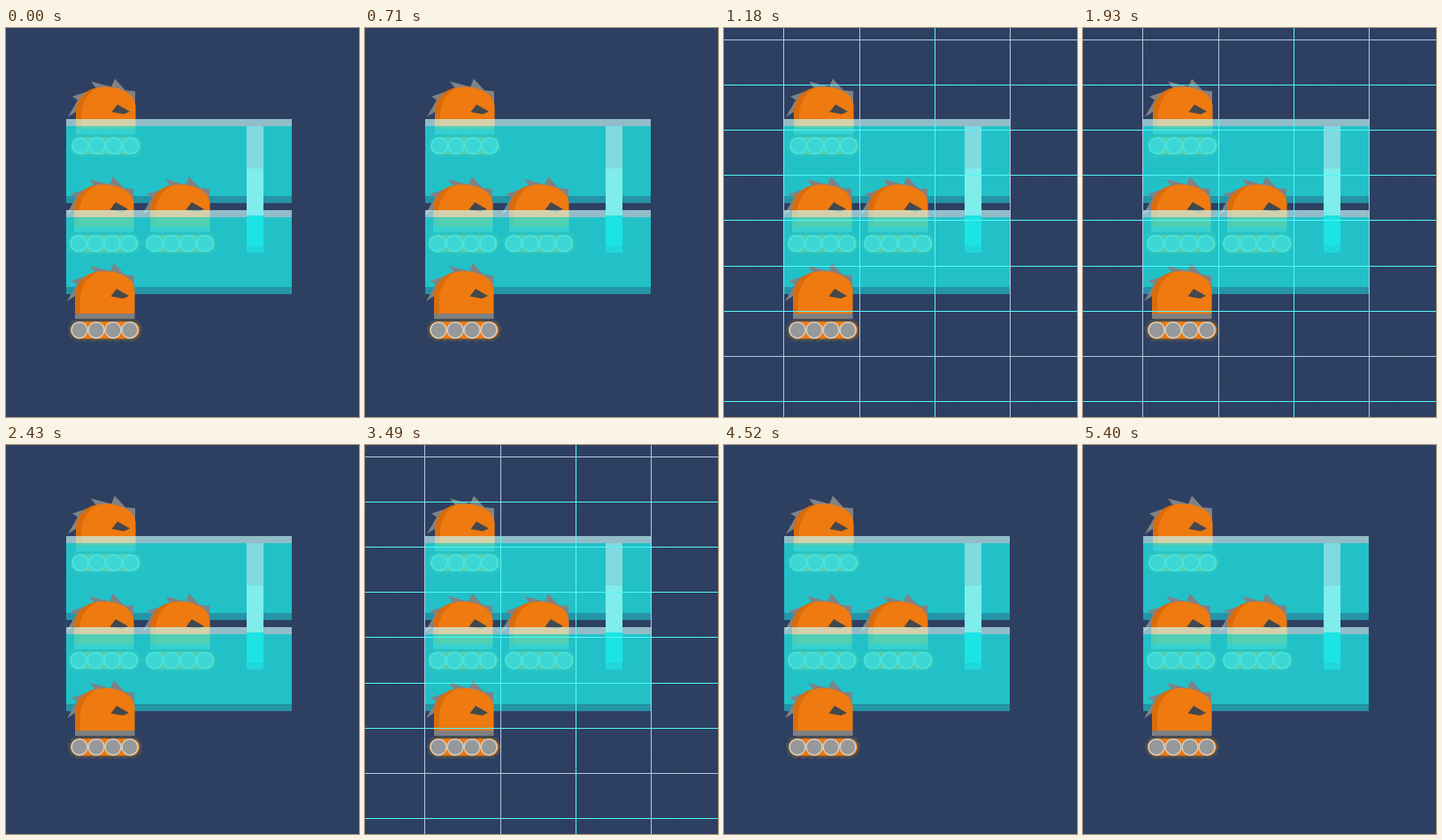
An HTML page that plays this animation: 399 by 440 pixels, repeating every 5.99 s.

```html
<!DOCTYPE html>
<html lang="en">
<head>
<meta charset="utf-8">
<title>Robots and water tanks</title>
<style>
  html, body { margin: 0; width: 100%; height: 100%; overflow: hidden; background: #2e4062; }
  svg { display: block; width: 399px; height: 440px; }
  .circuit { fill: none; stroke: #263759; stroke-width: 1; opacity: .4; }
  .grid { animation: blink 5990ms step-end infinite; shape-rendering: crispEdges; }
  .cyan { stroke: #4ff8fa; }
  .pale { stroke: #b3c8e4; }
  @keyframes blink {
    0% { visibility: hidden; }
    19.6995% { visibility: visible; }
    40.5676% { visibility: hidden; }
    58.2638% { visibility: visible; }
    75.4591% { visibility: hidden; }
    100% { visibility: hidden; }
  }
</style>
</head>
<body>
<svg viewBox="0 0 399 440">
  <defs>
    <g id="robot">
      <path fill="#808284" d="M69 309L80 290L74 286L101 277L95 269L118 275L122 266L134 279L145 280V302L110 310L80 302Z"/>
      <path fill="#ef7a10" d="M78 323V302C79 286 95 275 112 275C125 275 137 280 143 288L145.500 296V323Z"/>
      <path fill="#d96c0b" d="M78 323V302C79 288 90 277 104 275.500C92 281 85 292 84 305V323Z"/>
      <path fill="#43484c" d="M118.500 303.500L125 295L139 303L132 306Z"/>
      <rect x="78" y="323" width="67.500" height="6" fill="#7e8082"/>
      <rect x="72" y="331" width="80" height="21.500" rx="10.750" fill="#ef7a10" stroke="#4c4f50" stroke-width="2"/>
      <rect x="71" y="330" width="82" height="23.500" rx="11.750" fill="none" stroke="#4c4f50" stroke-width="2.500" stroke-dasharray="6 3"/>
      <g fill="#969899" stroke="#d3d1c8" stroke-width="1.500">
        <circle cx="83" cy="341.700" r="9"/>
        <circle cx="102" cy="341.700" r="9"/>
        <circle cx="121" cy="341.700" r="9"/>
        <circle cx="140" cy="341.700" r="9"/>
      </g>
    </g>
    <g id="tank">
      <rect width="255" height="8" fill="#c8ffff" fill-opacity=".65"/>
      <rect y="8" width="255" height="79" fill="#1eecea" fill-opacity=".75"/>
      <rect y="87" width="255" height="8" fill="#2494a6"/>
    </g>
  </defs>

  <rect width="399" height="440" fill="#2e4062"/>
  <path class="circuit" d="M68 0V52L76 60V95M76 0V30M222 0V70L230 78H270M262 0V72M330 20V100L345 115V200M360 0V80M20 60V160L34 174V290M8 180V300M68 320V400M76 370V440M222 440V390L234 378V330M262 440V385L250 373V320M335 240V340L350 355V440M375 130V260M20 330V400L40 420H60M160 30H210M285 350H330M100 400H200M285 60H320"/>

  <use href="#robot" x="1" y="-208.500"/>
  <use href="#tank" x="68" y="103"/>
  <use href="#robot" x="-1" y="-98"/>
  <use href="#robot" x="85" y="-98"/>
  <use href="#tank" x="68" y="206"/>

  <g shape-rendering="crispEdges">
    <rect x="272" y="111" width="19" height="48" fill="#80dae0"/>
    <rect x="272" y="159" width="19" height="53" fill="#7eedec"/>
    <rect x="272" y="212" width="19" height="34" fill="#1ce4e4"/>
    <rect x="272" y="246" width="19" height="8" fill="#20d8dc"/>
  </g>
  <use href="#robot"/>

  <g class="grid">
    <path class="cyan" d="M0 64.500H399M0 115.500H399M0 166.500H399M0 217.500H399M0 269.500H399M0 320.500H399M0 422.500H399M238.500 0V440"/>
    <path class="pale" d="M0 13.500H399M0 371.500H399M67.500 0V440M153.500 0V440M323.500 0V440"/>
    <path class="cyan" d="M153.500 103V301"/>
  </g>
</svg>
</body>
</html>
```
